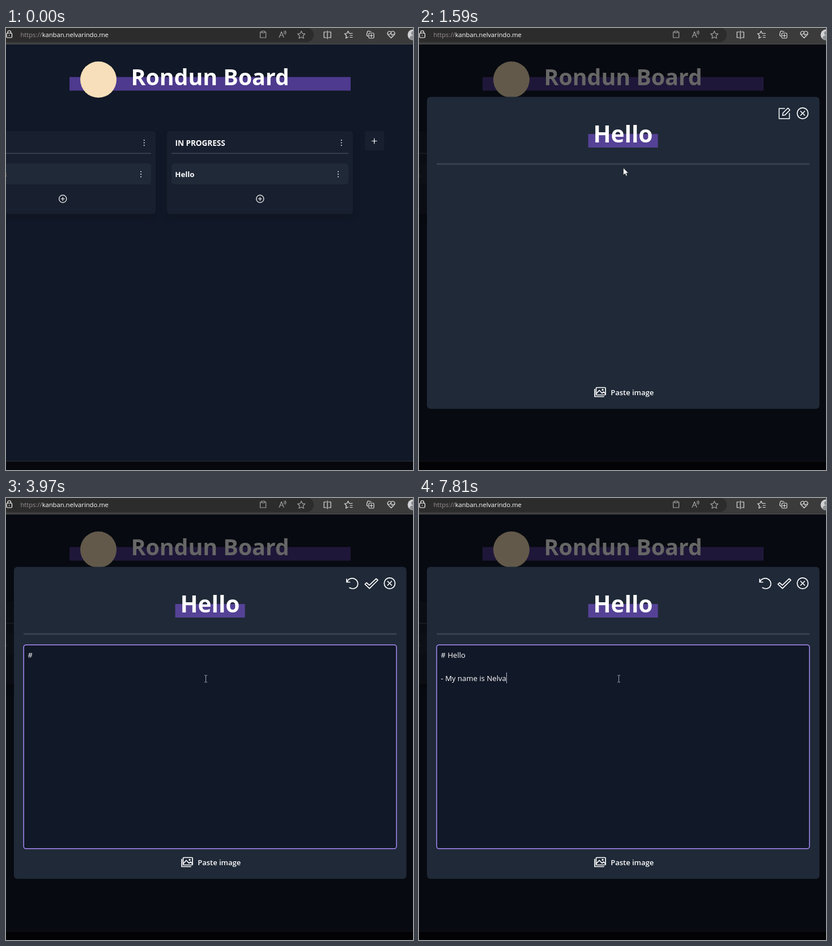
Animation of 718 by 780 pixels, one loop 8 s. Source, as an HTML page:

```html
<!DOCTYPE html>
<html lang="en">
<head>
<meta charset="utf-8">
<title>Kanban board</title>
<style>
  html, body { margin: 0; width: 100%; height: 100%; overflow: hidden; background: #111827; }
  svg { display: block; width: 718px; height: 780px; }
  text { font-family: "Open Sans", "Noto Sans", sans-serif; fill: #fff; white-space: pre; }
  .bold { font-weight: 700; }
  .semi { font-weight: 600; }
  .line { fill: none; stroke: #fff; stroke-width: 1.7; stroke-linecap: round; stroke-linejoin: round; }
  .thin { stroke-width: 1.2; }
  .note { font-size: 13.15px; }
  .raised { filter: drop-shadow(0 8px 6px rgba(0, 0, 0, .13)); }
</style>
</head>
<body>
<svg viewBox="0 0 718 780">
  <defs>
    <g id="dots" fill="#e5e7eb">
      <circle cy="-4.5" r="1"/><circle r="1"/><circle cy="4.5" r="1"/>
    </g>
    <g id="add" class="line thin">
      <circle r="6.6"/><path d="M-3 0H3M0-3V3"/>
    </g>
    <path id="star" d="M0-6.5 2-2.2 6.6-1.7 3.2 1.5 4.1 6.2 0 3.9-4.1 6.2-3.2 1.5-6.6-1.7-2-2.2Z"/>
    <g id="column">
      <rect class="raised" width="328" height="146" rx="5" fill="#18202f"/>
      <path d="M8 39.2H320" stroke="#525a6a"/>
      <rect x="8" y="57" width="312" height="37" rx="5" fill="#1f2937"/>
      <use href="#dots" x="307.7" y="20.5"/>
      <use href="#dots" x="302" y="76"/>
      <use href="#add" x="164.2" y="119.5"/>
    </g>
  </defs>

  <rect width="718" height="780" fill="#111827"/>

  <g id="board">
    <rect x="112" y="86.5" width="496" height="24" fill="#8b5cf6" opacity=".5"/>
    <circle cx="163" cy="91" r="32" fill="#f6dfba"/>
    <text class="bold" x="220.5" y="101" font-size="39.3">Rondun Board</text>
    <use href="#column" x="-64" y="182"/>
    <use href="#column" x="284" y="182"/>
    <text class="semi" x="1.5" y="263" font-size="13.2" text-anchor="end" style="fill:#d99a50">s</text>
    <text class="bold" x="298.5" y="208" font-size="13.5">IN PROGRESS</text>
    <text class="bold" x="298.3" y="263" font-size="13.2">Hello</text>
    <rect x="633" y="182" width="34" height="34" rx="4" fill="#18202f"/>
    <path class="line thin" d="M645.5 199.5H654M649.7 195.2V203.8"/>
    <rect y="764" width="718" height="16" fill="#07080d"/>
    <path d="M0 764.5H718" stroke="#2b303a"/>
  </g>

  <rect id="shade" y="29" width="718" height="751"/>

  <g id="modal">
    <rect x="14" y="121.5" width="692.5" height="550.5" rx="6" fill="#1f2937"/>
    <rect x="298.5" y="187" width="123" height="24" fill="#8b5cf6" opacity=".5"/>
    <text class="bold" x="360" y="202" font-size="40.6" text-anchor="middle">Hello</text>
    <rect x="31" y="238.5" width="658" height="3" fill="#374151"/>
    <g class="line">
      <circle cx="676.8" cy="150.5" r="9.6"/>
      <path d="M673.3 147 680.3 154M680.3 147 673.3 154"/>
    </g>
    <g id="edit" class="line" style="stroke-width:1.5">
      <path d="M645 142H635.300V160H653.500V150.500"/>
      <path d="M641.300 154.300 642 150 650.800 141.300 654.300 144.800 645.600 153.600Z"/>
    </g>
    <g id="editor">
      <rect x="31.2" y="259.2" width="657.6" height="359.6" rx="4" fill="#111827" stroke="#a78bfa" stroke-width="1.5"/>
      <text id="row0" class="note" x="38.5" y="282"></text>
      <text id="row2" class="note" x="38.5" y="323"></text>
      <rect id="caret" width="1" height="19" fill="#b9b8cf"/>
      <path class="line" d="M601 143V148.5H606.5M601.5 148C604 142 611 139.7 616.5 143.5C622 147.5 622 155 617 158.5C614 160.5 609 160.5 606 158.3"/>
      <path id="check" class="line" d="M633.2 152.2 636 149.5 641 153.8 653 142.3 656 145 641.2 159.7Z"/>
    </g>
    <g class="line">
      <rect x="312.5" y="634.5" width="16.5" height="13" rx="1"/>
      <path d="M310 637.5V650.5H326M313 645 318 639.5 323 644.5 325.5 642 329 645.5"/>
      <circle cx="324" cy="638.5" r=".8"/>
    </g>
    <text class="semi" x="338.3" y="648" font-size="12.95">Paste image</text>
  </g>

  <g id="browser">
    <rect width="718" height="28" fill="#3b3b3b"/>
    <rect x="-30" y="-1" width="573" height="26" rx="13" fill="#2c2c2c"/>
    <path d="M0 28.5H718" stroke="#4b4d52"/>
    <g class="line thin">
      <rect x="1" y="9" width="9.5" height="8" rx="1.5"/>
      <path d="M3 9V7.5A2.7 2.7 0 0 1 8.5 7.5V9M5.7 12.7V13.3"/>
    </g>
    <text x="25.5" y="16" font-size="11.2"><tspan fill="#9a8f97">https://</tspan>kanban.nelvarindo.me</text>
    <g class="line thin" style="stroke:#a3a3a3">
      <path d="M451 7H448.5V17H458.5V7H456M451 5.5H456V8.5H451Z"/>
      <path d="M482 16.5 486 6.5 490 16.5M483.5 13H488.5M490.5 6Q492 8 490.5 10M492.5 5Q495 8 492.5 11"/>
      <use href="#star" x="521" y="12"/>
    </g>
    <g class="line thin" style="stroke:#e2e2e2">
      <path d="M565 7H561V17H565M569 7H573V17H569M567 5V19"/>
      <path d="M603.5 16 599.5 18 600.5 13.5 597.5 10 601.5 9.5 603.5 5.5 605.5 9.5H611M607 13H611M607 16.5H611"/>
      <path d="M638.5 14.5Q636 13.5 636.5 11L637.5 7Q638 5 640 5.5L644 6.5"/>
      <rect x="640" y="9" width="9" height="9" rx="1.5"/>
      <path d="M642 13.5H647M644.5 11V16"/>
      <path d="M679.5 17.5 674.5 12.5C670.5 8 676.5 3 679.5 7.5C682.5 3 688.5 8 684.5 12.5ZM673.5 11H677.5L679 8.5 681 13 682.5 11H685"/>
    </g>
    <circle cx="718" cy="12" r="9.5" fill="#d0d1d4"/>
    <path d="M712 18Q713 13 718 13V21Q714 21 712 18Z" fill="#8b8d92"/>
    <circle cx="718" cy="9" r="3.2" fill="#8b8d92"/>
  </g>

  <circle id="press" r="10.5" fill="#c3b800" opacity=".72"/>
  <g id="pointer">
    <path id="arrow" d="M0 0V12.5L2.9 9.8 4.9 14 6.9 13.1 5 9H8.8Z" fill="#fff" stroke="#222" stroke-width=".6"/>
    <path id="hand" d="M-1 1.2Q0-.8 1.3 1.2V5.5L5.5 6.5Q7.5 7 7.3 9L6.3 13V15.5H-.5V13.5L-4 9.3Q-4.2 7.5-2.5 8L-1 9.2Z" fill="#fff" stroke="#222" stroke-width=".6"/>
    <path id="beam" d="M-2.5-6H-.6L0-5.5.6-6H2.5M0-5.5V5.5M-2.5 6H-.6L0 5.5.6 6H2.5" fill="none" stroke="#a4a8b0"/>
  </g>
</svg>
<script>
const LOOP = 8000;
const OPENING = [[1130, .15], [1200, .5], [1270, 1]];
const EDITING = 2250;
const NOTE = "# Hello\n\n- My name is Nelva";
const KEY_TIMES = [
  3310, 3500, 4100, 4230, 4300, 4440, 4570, 4760, 5430,
  5630, 5760, 6090, 6220, 6360, 6490, 6620, 6690, 6750, 6820,
  7020, 7090, 7210, 7280, 7420, 7550, 7680, 7810
];
const CARET_OFF = [[2780, 3310], [3970, 4100], [5300, 5430]];
const CLICKS = [[1000, 1130], [2120, 2250]];
// Pointer moves: start, end, from x, from y, to x, to y
const MOVES = [
  [390, 1000, 480, 692, 325.5, 258.5],
  [1470, 2060, 325.5, 258.5, 647, 152],
  [2320, 2780, 647, 152, 352.5, 319]
];

const $ = id => document.getElementById(id);
const show = (id, on) => $(id).setAttribute("display", on ? "inline" : "none");
const during = (spans, t) => spans.some(([a, b]) => t >= a && t < b);
const inBox = ([x, y], l, t, r, b) => x >= l && x <= r && y >= t && y <= b;

function pointerAt(t) {
  const [start, end, x0, y0, x1, y1] = MOVES.filter(m => t >= m[0]).pop() || MOVES[0];
  const u = Math.min(1, Math.max(0, (t - start) / (end - start)));
  const k = u * u * (3 - 2 * u);
  return [x0 + (x1 - x0) * k, y0 + (y1 - y0) * k];
}

function drawNote(t) {
  const typed = NOTE.slice(0, KEY_TIMES.filter(k => t >= k).length);
  const rows = typed.split("\n");
  $("row0").textContent = rows[0];
  $("row2").textContent = rows[2] || "";
  const last = rows.length - 1;
  const width = rows[last] ? $("row" + last).getComputedTextLength() : 0;
  $("caret").setAttribute("x", Math.round(38.7 + width));
  $("caret").setAttribute("y", 267 + 20.5 * last);
  show("caret", !during(CARET_OFF, t));
}

function drawPointer(t, editing) {
  const pos = pointerAt(t);
  const overIcon = t >= 1270 && inBox(pos, 633, 140, 657, 162);
  const overCard = t < 1130 && inBox(pos, 292, 239, 604, 276);
  const overText = editing && inBox(pos, 31, 259, 689, 619);
  const place = `translate(${pos})`;
  $("pointer").setAttribute("transform", place);
  $("press").setAttribute("transform", place);
  show("pointer", t >= 390);
  show("press", during(CLICKS, t));
  show("hand", overIcon || overCard);
  show("beam", overText);
  show("arrow", !overIcon && !overCard && !overText);
  $("edit").style.stroke = overIcon ? "#a78bfa" : "#fff";
  $("check").style.stroke = overIcon ? "#3fb573" : "#fff";
}

function render(t) {
  const open = (OPENING.filter(s => t >= s[0]).pop() || [0, 0])[1];
  const editing = t >= EDITING;
  $("shade").setAttribute("opacity", .6 * open);
  $("modal").setAttribute("opacity", open);
  show("edit", !editing);
  show("editor", editing);
  if (editing) drawNote(t);
  drawPointer(t, editing);
}

const begin = performance.now();
function tick() {
  render((performance.now() - begin) % LOOP);
  requestAnimationFrame(tick);
}
tick();
</script>
</body>
</html>
```
